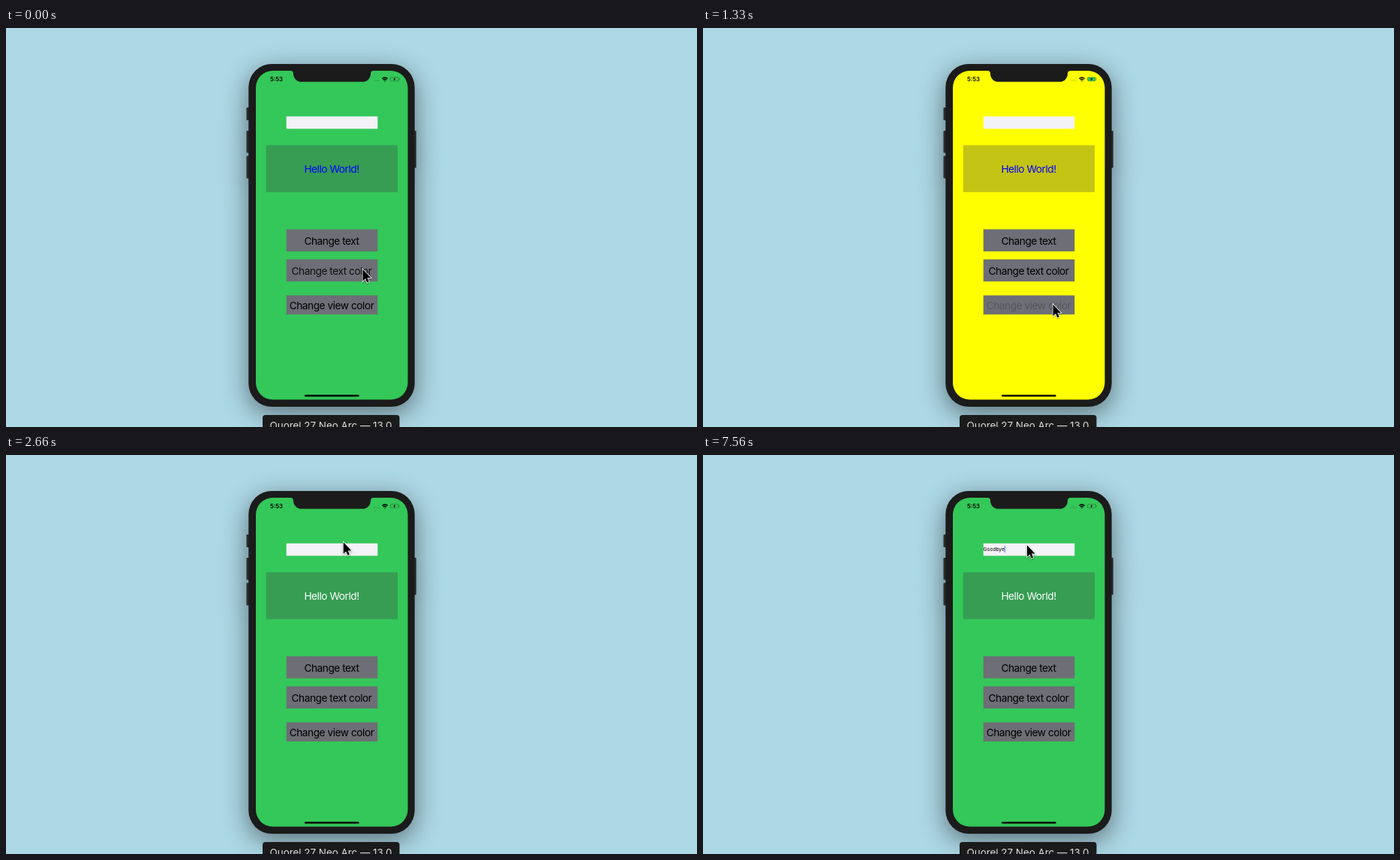
An HTML page that plays this animation: 921x532 px, repeating every 8 s.

```html
<!DOCTYPE html>
<html lang="en">
<head>
<meta charset="utf-8">
<title>Phone simulator demo</title>
<style>
  html, body { margin: 0; width: 100%; height: 100%; overflow: hidden; background: #add8e6; }
  svg { display: block; font-family: Inter, Roboto, sans-serif; }
  .label { font-size: 13.7px; letter-spacing: -.034em; text-anchor: middle; }
  .shadow { filter: drop-shadow(0 9px 17px rgba(0, 0, 0, .48)); }
  .cursor { filter: drop-shadow(0 1px 1px rgba(0, 0, 0, .35)); paint-order: stroke; }
</style>
</head>
<body>
<svg width="921" height="532" viewBox="0 0 921 532">
  <g class="shadow" fill="#2b2b2d">
    <rect x="320.5" y="106" width="5" height="17" rx="1"/>
    <rect x="320.5" y="137" width="5" height="29.5" rx="1"/>
    <rect x="320.5" y="170.5" width="5" height="30" rx="1"/>
    <rect x="542" y="137" width="4.8" height="49.5" rx="1"/>
    <rect x="323.3" y="48" width="221.4" height="457" rx="31" fill="#1b1b1b"/>
  </g>
  <rect id="screen" x="333" y="57" width="202.5" height="438.5" rx="22.5"/>
  <path fill="#1b1b1b" d="M379 56.5V57A4 4 0 0 1 383 61A10.8 10.8 0 0 0 393.8 71.8H475.2A10.8 10.8 0 0 0 486 61A4 4 0 0 1 490 57V56.5Z"/>

  <text x="352" y="71" font-size="7.8" font-weight="600">5:53</text>
  <path stroke="#000" stroke-opacity=".3" stroke-dasharray="1.2 1.2" d="M490 70.2H498"/>
  <g fill="none" stroke="#000" stroke-width="1.4">
    <path d="M501.3 67.6Q505 64.2 508.7 67.6"/>
    <path d="M502.8 69.2Q505 67.3 507.2 69.2"/>
  </g>
  <path d="M503.8 70.2H506.2L505 71.6Z"/>
  <rect x="512.5" y="65.7" width="10.6" height="5" rx="1.4" fill="#34c759" stroke="#000" stroke-opacity=".4" stroke-width=".7"/>
  <path fill-opacity=".4" d="M523.9 67.2h.8v2h-.8Z"/>
  <path d="M518.5 66L516 68.6H517.6L517.1 70.4L519.6 67.8H518Z"/>

  <rect x="373.7" y="117.8" width="121.6" height="16.6" fill="#f2f2f7"/>
  <text id="typed" x="373.6" y="128.2" font-size="6.7" letter-spacing="-.06"></text>
  <rect id="caret" y="121.3" width="1" height="8.7" fill="#426be0"/>

  <rect x="346.7" y="156.3" width="175.3" height="62.5" fill="#3e3c46" fill-opacity=".3"/>
  <text id="hello" class="label" x="434" y="193">Hello World!</text>

  <g fill="#6d6e76">
    <rect x="373.7" y="268.4" width="121.6" height="29.4"/>
    <rect x="373.7" y="308.5" width="121.6" height="29.4"/>
    <rect x="373.7" y="356.5" width="121.6" height="25.4"/>
  </g>
  <text class="label" x="434" y="288.5">Change text</text>
  <text id="textColor" class="label" x="434" y="328.6">Change text color</text>
  <text id="viewColor" class="label" x="434" y="374.6">Change view color</text>

  <rect x="398" y="489" width="72.5" height="2.6" rx="1.3"/>
  <rect x="342" y="516" width="182.5" height="24" rx="4" fill="#1b1b1b"/>
  <text x="433" y="534.6" font-size="13.4" fill="#ddd" text-anchor="middle">Quorel 27 Neo Arc — 13.0</text>

  <path id="cursor" class="cursor" stroke="#fff" stroke-width="1.5" d="M0 0V15.6L3.5 12.3L5.8 17.6L8.3 16.5L6 11.3H10.7Z"/>
</svg>
<script>
const LOOP = 8000, STEPS = 54, STEP = LOOP / STEPS;
const el = id => document.getElementById(id);

// One key per step; a dot is a pause.
const KEYS = 'G...o..od...bye', TYPING_START = 36;

const HOME = { x: 475.5, y: 321.8 };
const MOVES = [
  { from: 3, to: 7, x: 466.5, y: 368.5 },
  { from: 12, to: 16, x: 449.7, y: 116.2 },
  { from: 18, to: 21, x: 449.7, y: 122.8 },
  { from: 26, to: 28, x: 431.9, y: 120.2 }
];

const clamp = v => Math.min(1, Math.max(0, v));
const easeOut = p => 1 - (1 - p) ** 2;

function cursorAt(step) {
  return MOVES.reduce((pos, move) => {
    const p = easeOut(clamp((step - move.from) / (move.to - move.from)));
    return { x: pos.x + (move.x - pos.x) * p, y: pos.y + (move.y - pos.y) * p };
  }, HOME);
}

// A button label dims while pressed and fades back after release.
const pressOpacity = (step, down, up) =>
  step < down ? 1 : clamp(.2 + .65 * Math.max(0, step - up));

function draw(t) {
  const step = Math.floor((t + 12) / STEP) % STEPS;
  const { x, y } = cursorAt(step);
  el('cursor').setAttribute('transform', `translate(${x} ${y})`);
  el('screen').setAttribute('fill', step >= 9 && step < 18 ? '#ff0' : '#34c759');
  el('hello').setAttribute('fill', step < 18 ? '#00f' : '#fff');
  el('textColor').setAttribute('opacity', pressOpacity(step, -2, -1));
  el('viewColor').setAttribute('opacity', pressOpacity(step, 8, 9));

  const typed = el('typed');
  typed.textContent = KEYS.slice(0, Math.max(0, step - TYPING_START + 1)).replaceAll('.', '');
  el('caret').setAttribute('x', 373.6 + typed.getComputedTextLength());
  el('caret').setAttribute('opacity', step >= 27 && (step < 34 || step >= TYPING_START) ? 1 : 0);
}

const start = performance.now();
function tick() {
  draw((performance.now() - start) % LOOP);
  requestAnimationFrame(tick);
}
tick();
</script>
</body>
</html>
```
